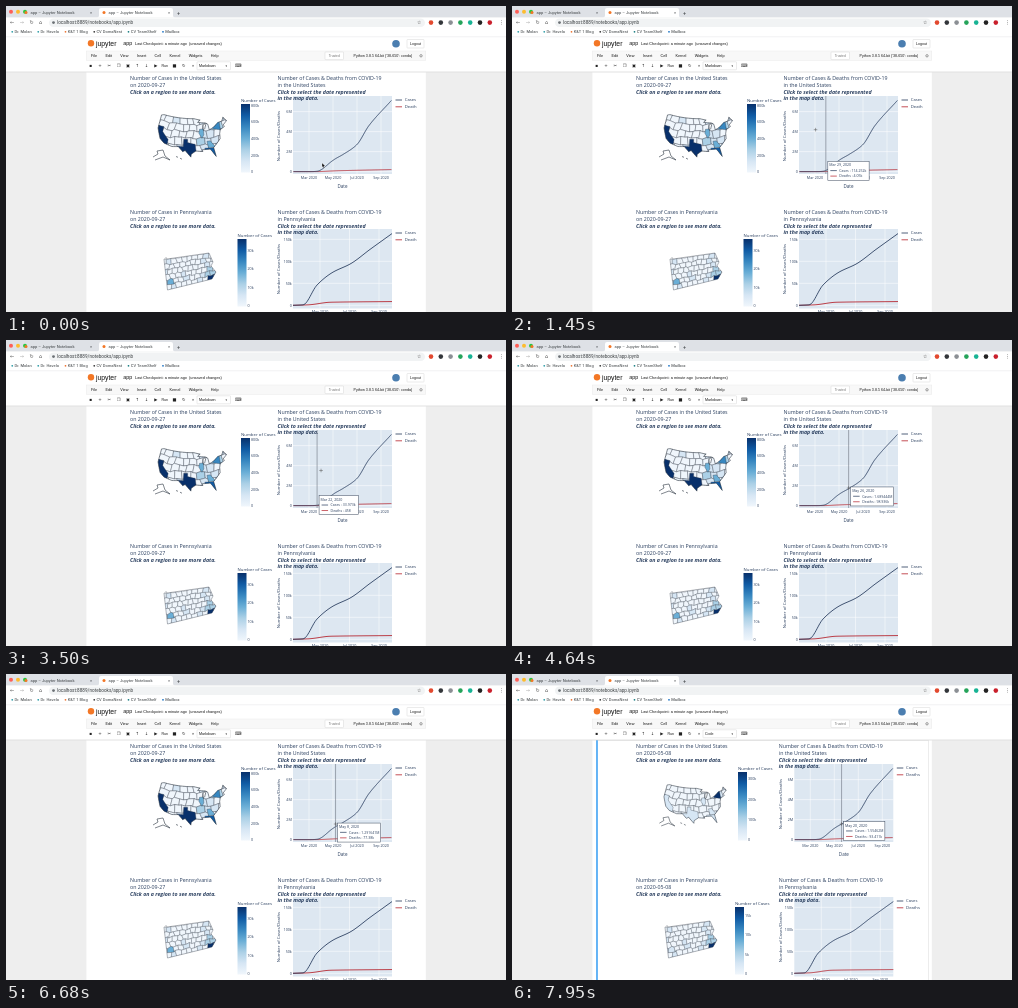
Animation of 500x306 px, one loop 8000 ms. Source, as an HTML page:

```html
<!DOCTYPE html>
<html lang="en">
<head>
<meta charset="utf-8">
<title>Notebook dashboard</title>
<style>
html, body { margin: 0; width: 100%; height: 100%; overflow: hidden; background: #eee; }
svg { display: block; width: 100%; height: 100%; }
text { white-space: pre; }
.ui { font-family: Roboto, sans-serif; fill: #3c4043; }
.nb { font-family: "Liberation Sans", sans-serif; fill: #111; }
.plot { font-family: "Open Sans", sans-serif; fill: #2a3f5f; }
.icon { font-family: "DejaVu Sans", sans-serif; fill: #222; }
.strong { font-weight: 700; font-style: italic; }
.mid { text-anchor: middle; }
.end { text-anchor: end; }
.borders { stroke: #2b3440; stroke-width: .36; stroke-linejoin: round; }
</style>
</head>
<body>
<svg id="stage" viewBox="0 0 500 306" preserveAspectRatio="none"></svg>
<script>
const LOOP = 8000, HOVER_LAG = 150, SELECT_AT = 7250, UPDATE_AT = 7600, SHIFT = -4.7;
const NAVY = '#24385a', RED = '#b5222b';
const BLUES = ['#f0f6fc', '#d6e6f4', '#abd0e6', '#6aaed6', '#3787c0', '#105ba4', '#08306b'];

const text = (x, y, size, str, cls = 'plot', extra = '') =>
  `<text x="${x}" y="${y}" font-size="${size}" class="${cls}" ${extra}>${str}</text>`;
const rect = (x, y, w, h, fill, extra = '') =>
  `<rect x="${x}" y="${y}" width="${w}" height="${h}" fill="${fill}" ${extra}/>`;
const dot = (x, y, r, fill) => `<circle cx="${x}" cy="${y}" r="${r}" fill="${fill}"/>`;
const line = (x1, y1, x2, y2, stroke, w = 0.5) =>
  `<path d="M${x1} ${y1}L${x2} ${y2}" stroke="${stroke}" stroke-width="${w}"/>`;
const path = pts => 'M' + pts.map(p => p.map(n => n.toFixed(2)).join(' ')).join('L');
const box = (x, y, w, h) => rect(x, y, w, h, '#fff', 'stroke="#ccc" stroke-width=".4" rx=".6"');
const repeat = (n, fn) => Array.from({ length: n }, (_, i) => fn(i));
const points = str => str.split(' ').map(p => p.split(',').map(Number));
const flow = (items, gap) => items.map((s, i) => `<tspan dx="${i ? gap : 0}">${s}</tspan>`).join('');

function randomizer(seed) {
  return () => (seed = seed * 16807 % 2147483647) / 2147483647;
}

// Monotone cubic through rows of [at, value, ...]
function spline(keys, at, col = 1) {
  const last = keys.length - 1;
  if (at <= keys[0][0]) return keys[0][col];
  if (at >= keys[last][0]) return keys[last][col];
  const slope = i => (keys[i + 1][col] - keys[i][col]) / (keys[i + 1][0] - keys[i][0]);
  const tangent = i => {
    if (i === 0 || i === last) return slope(i ? i - 1 : 0);
    const a = slope(i - 1), b = slope(i);
    return a * b > 0 ? 2 * a * b / (a + b) : 0;
  };
  const i = keys.findIndex(k => k[0] > at) - 1, h = keys[i + 1][0] - keys[i][0], s = (at - keys[i][0]) / h;
  const rise = s * s * (3 - 2 * s);
  return keys[i][col] * (1 - rise) + keys[i + 1][col] * rise +
    h * s * (1 - s) * ((1 - s) * tangent(i) - s * tangent(i + 1));
}

function browser() {
  let s = rect(0, 0, 500, 11.5, '#dee1e6') + rect(0, 11.5, 500, 20, '#fff');
  s += ['#fe5f57', '#febc2e', '#28c840'].map((c, i) => dot(5 + i * 7, 5.8, 2, c)).join('');
  s += '<path d="M91 11.5q2 0 2-2V4q0-2 2-2h70q2 0 2 2v5.500q0 2 2 2z" fill="#fff"/>';
  s += repeat(2, i => dot(20 + i * 78, 6.5, 1.5, '#f37726') +
    text(24.5 + i * 78, 8, 4.1, 'app – Jupyter Notebook', 'ui') + text(84 + i * 78, 8, 4, '×', 'ui')).join('');
  s += text(171, 8.6, 5.5, '+', 'ui');
  s += [...'←→↻⌂'].map((g, i) => text(4 + i * 9.7, 18.3, 5, g, 'icon', `opacity="${i === 1 ? 0.4 : 0.8}"`)).join('');
  s += rect(43, 12.4, 376, 8.6, '#f1f3f4', 'rx="4.3"') + dot(47.5, 16.6, 1.4, '#6b7075');
  s += text(51, 18.2, 4.65, 'localhost:8889/notebooks/app.ipynb', 'ui') + text(411, 18.3, 4.8, '☆', 'icon');
  s += ['#e2492f', '#33363a', '#8b8f94', '#25a35a', '#18b394', '#222', '#c9202c']
    .map((c, i) => dot(425 + i * 9.8, 16.6, 2.3, c)).join('');
  s += text(493, 18.3, 5, '⋮', 'icon');
  const marks = [['Dr. Molan', '#2a9aa5'], ['Dr. Havelo', '#2a9aa5'], ['K&amp;T 1 Blog', '#ee7432'], ['CV DomaNest', '#333'],
    ['CV TeamShelf', '#1a7f83'], ['Mailbox', '#1670c4']];
  s += text(5, 27.2, 4.1, flow(marks.map(([name, c]) => `<tspan fill="${c}">●</tspan> ${name}`), 5.2), 'ui');
  return s + line(0, 31, 500, 31, '#d5d7da');
}

function notebook() {
  let s = rect(0, 31.2, 500, 35, '#fff') + rect(80.4, 66, 339.4, 240, '#fff');
  s += dot(85, 37.3, 3.2, '#f37726') + text(90, 39.6, 6.8, 'jupyter', 'nb');
  s += text(117.3, 39.4, 5.3, 'app', 'nb') + text(129, 39.2, 3.85, 'Last Checkpoint: a minute ago  (unsaved changes)', 'nb');
  s += dot(390, 37.8, 3.8, '#4b7eb0') + box(401, 33.5, 17, 8.5) + text(409.5, 39.1, 3.6, 'Logout', 'nb mid');
  s += rect(80.4, 45, 339.4, 9.6, '#f8f8f8', 'stroke="#e7e7e7" stroke-width=".4"');
  s += text(85, 51.2, 3.8, flow(['File', 'Edit', 'View', 'Insert', 'Cell', 'Kernel', 'Widgets', 'Help'], 8.3), 'nb');
  s += box(319, 46, 18.5, 7.6) + text(328.2, 51, 3.3, 'Trusted', 'nb mid', 'opacity=".6"');
  s += text(347.5, 51.1, 3.65, "Python 3.8.5 64-bit ('38-650': conda)", 'nb');
  s += '<circle cx="415" cy="49.8" r="1.2" fill="none" stroke="#444" stroke-width=".5"/>';
  s += [...'▪+✂❐▣↑↓▶ ■↻»'].map((g, i) => text(84.7 + i * 9.3, 61.3, 4.2, g, 'icon mid')).join('');
  s += text(155.5, 61.2, 3.6, 'Run', 'nb') + box(191, 55.8, 33.5, 8) + text(219.5, 61, 3, '▾', 'icon');
  s += text(193, 61.1, 3.6, '', 'nb', 'id="cellType"') + text(229, 61.3, 4.5, '⌨', 'icon');
  s += line(0, 66, 500, 66, '#cfcfcf', 0.6);
  return s + `<g id="cellFrame">${rect(84.5, 66.3, 332, 250, 'none', 'stroke="#cfcfcf" stroke-width=".4"')}${rect(84.2, 66.3, 1.6, 240, '#42a5f5')}</g>`;
}

// Irregular brickwork of areas; place(u, v) maps the unit square to the stage
function patchwork(cols, rows, seed, place, shade) {
  const rand = randomizer(seed);
  const lattice = repeat(rows + 1, j => repeat(2 * cols + 4, i =>
    place((i - 1 + (rand() - 0.5) * 0.7) / (2 * cols), (j + (rand() - 0.5) * 0.35) / rows)));
  return repeat(rows, r => repeat(cols + 1, c => {
    const i = 2 * c + r % 2, top = lattice[r].slice(i, i + 3), bottom = lattice[r + 1].slice(i, i + 3).reverse();
    return `<path d="${path([...top, ...bottom])}Z" fill="${BLUES[shade(top[1], rand())]}"/>`;
  }).join('')).join('');
}

// Albers conic projection, so parallels bend
function project(lon, lat) {
  const rad = Math.PI / 180, n = 0.6028, a = n * (lon + 96) * rad;
  const rho = f => Math.sqrt(1.3512 - 2 * n * Math.sin(f * rad)) / n;
  return [187 + 95 * rho(lat) * Math.sin(a), 131 - 95 * (rho(38) - rho(lat) * Math.cos(a))];
}
const geo = str => {
  const pts = points(str);
  return path(pts.flatMap(([x, y], i) => {
    const [nx, ny] = pts[(i + 1) % pts.length];
    return repeat(4, k => project(x + (nx - x) * k / 4, y + (ny - y) * k / 4));
  })) + 'Z';
};
const COAST = geo('-124.7,48.4 -124.3,40.3 -120.6,34.6 -117.1,32.5 -111,31.3 -106.5,31.8 -103.1,29 -101.4,29.8 -97.4,25.9 ' +
  '-97.2,27.7 -94,29.6 -89.2,29.1 -89.5,30.2 -84,30.1 -82.7,28.5 -80.6,25.2 -81.4,30.7 -75.6,35.3 -75.1,38.4 -74,40.5 ' +
  '-70,41.8 -70.8,42.8 -67,44.8 -69.2,47.4 -71,45.3 -74.8,45 -78.9,42.8 -82.7,41.6 -83.3,45 -84.7,45.8 -86.4,42.5 ' +
  '-87.6,41.8 -87.5,44.5 -85,46 -92,46.7 -89.6,48 -95.2,49 -109,49 -122.7,49');

// Notable areas with their shade before and after the update
const STATES = [
  ['-126,42 -120,42 -120,39 -114.6,35 -114.6,32 -126,32', 6, 1],
  ['-103,36.5 -100,36.5 -100,34.6 -94.4,33.6 -93.7,28 -97,24 -107,27 -107,32 -103,32', 6, 1],
  ['-87.6,31 -81,30.7 -79,24 -88,28', 5, 1],
  ['-79.8,42 -73.9,40.4 -73.4,46 -80,44', 4, 6],
  ['-90.6,42.5 -87.5,42.5 -87.5,39 -89.2,37 -91.4,40.3', 3, 1],
  ['-85.6,35 -83.1,35 -80,31 -85,31', 3, 1]
];

function usMap(after) {
  const eastern = ([x], r) => after ? +(x > 203 && r > 0.6) : x < 190 ? +(r > 0.75) : r < 0.4 ? 0 : r < 0.75 ? 1 : 2;
  const place = (u, v) => project(-125 + 58 * Math.sign(u) * Math.abs(u) ** 0.85, 49.5 - 25 * v);
  const states = STATES.map(([area, a, b]) => `<path d="${geo(area)}" fill="${BLUES[after ? b : a]}"/>`).join('');
  return `<g class="borders" transform="${after ? 'translate(13.6 11.8) scale(.91)' : ''}">
    <g clip-path="url(#land)">${patchwork(10, 6, 5, place, eastern)}${states}</g>
    <path d="${COAST}M147 151l5-3-1-3 6-1 2 6 5 4-7-3-8 3M170 150.500l2 .8M174 152.200l2 1" fill="none" stroke-width=".6"/></g>`;
}

const REGION = path(points('158,253.5 160,251.5 161,253 203,247 207,256 205,260 210,266 206,273 161.5,284')) + 'Z';
function countyMap(after) {
  const place = (u, v) => [157 + 53 * u + 3 * v, 254 - 8 * u + (30.5 - 4 * u) * v];
  const near = ([x, y], hx, hy) => Math.hypot(x - hx, y - hy);
  const shade = (p, r) => near(p, 207, 269) < 3 ? 6 : near(p, 205, 267) < 7 ? 2 : near(p, 167, 272) < 3 ? (after ? 1 : 3) : +(r > 0.8);
  return `<g class="borders" transform="translate(${after ? -5 : 0} 0)"><g clip-path="url(#region)" stroke-width=".3">
    ${patchwork(10, 6, 11, place, shade)}</g><path d="${REGION}" fill="none"/></g>`;
}

function colorBar(x, y, height, step, unit, count) {
  return text(x, y - 2.4, 4.3, 'Number of Cases') + rect(x, y, 9, height, 'url(#blues)') +
    repeat(count, i => text(x + 10, y + height + 0.8 - i * step, 3.7, i ? i * unit + 'k' : '0')).join('');
}

// Known totals; day 0 is 22 January 2020
const CASES = [[0, 0], [45, 400], [60, 33973], [100, 1109726], [107, 1291641], [119, 1554620], [125, 1689444],
  [161, 2690000], [192, 4600000], [249, 7110000]];
const DEATHS = [[0, 0], [60, 458], [100, 64902], [107, 77380], [119, 93411], [125, 98936], [249, 204500]];
const REGION_CASES = [[287, 0], [297, 1], [311, 46], [326, 74], [345, 95], [364, 127], [386, 163]];
const REGION_DEATHS = [[287, 0], [302, 1], [325, 7], [386, 8.5]];
const dayX = day => 287.5 + 0.393 * day;
const countY = v => 165.6 - v / 1e5;

function chart({ top, bottom, zero, stepY, labelY, firstX, stepX, months, cases, deaths, after }) {
  const trace = (pts, c) => `<path d="${path(pts)}" fill="none" stroke="${c}" stroke-width=".85"/>`;
  let s = rect(287, top, 99, bottom - top, '#dde7f1');
  s += repeat(4, i => line(287, zero - i * stepY, 386, zero - i * stepY, '#fff') +
    text(285.8, zero - i * stepY + 1.3, 3.7, i ? labelY(i) : '0', 'plot end')).join('');
  s += months.map((m, i) => line(firstX + i * stepX, top, firstX + i * stepX, bottom, '#fff') +
    text(firstX + i * stepX, bottom + 4.8, 3.7, m + ' 2020', 'plot mid')).join('');
  s += trace(deaths, RED) + trace(cases, NAVY);
  s += [['Cases', NAVY], [after ? 'Deaths' : 'Death', RED]].map(([label, c], i) =>
    line(389.5, top + 4 + i * 6.8, 396, top + 4 + i * 6.8, c, 0.8) + text(398.8, top + 5.4 + i * 6.8, 4.2, label)).join('');
  return s + text(0, 0, 4.3, 'Number of Cases/Deaths', 'plot mid', `transform="translate(274.3 ${top + 40}) rotate(-90)"`);
}

const heading = (x, y, lines) =>
  lines.map((l, i) => text(x, y + i * 6.7, 5.25, l, i < 2 ? 'plot' : 'plot strong')).join('');

function dashboard(after) {
  const daily = series => repeat(250, d => [dayX(d), countY(spline(series, d))]);
  const regional = series => repeat(100, i => [287 + i, 299.3 - 0.44 * spline(series, 287 + i)]);
  const date = after ? 'on 2020-05-08' : 'on 2020-09-27';
  const left = ['the United States', 'Pennsylvania'].map((place, i) =>
    heading(124, 74.3 + i * 134, ['Number of Cases in ' + place, date, 'Click on a region to see more data.'])).join('');
  const right = ['the United States', 'Pennsylvania'].map((place, i) =>
    heading(271.5, 74.3 + i * 134, ['Number of Cases &amp; Deaths from COVID-19', 'in ' + place,
      'Click to select the date represented', 'in the map data.'])).join('');
  const bars = after
    ? colorBar(226, 98, 68.5, 20.4, 100, 4) + colorBar(223, 233, 67.5, 19.5, 5, 4)
    : colorBar(235, 98, 68.5, 16.7, 200, 5) + colorBar(231.5, 233, 67.5, 18.6, 10, 4);
  const charts = chart({ top: 90, bottom: 168, zero: 165.6, stepY: 20, labelY: i => 2 * i + 'M', firstX: 303, stepX: 24,
    months: ['Mar', 'May', 'Jul', 'Sep'], cases: daily(CASES), deaths: daily(DEATHS), after }) +
    chart({ top: 223, bottom: 302.5, zero: 299.3, stepY: 22, labelY: i => 50 * i + 'k', firstX: 314, stepX: 29.5,
      months: ['May', 'Jul', 'Sep'], cases: regional(REGION_CASES), deaths: regional(REGION_DEATHS), after });
  return left + usMap(after) + countyMap(after) + bars +
    `<g transform="translate(${after ? SHIFT : 0} 0)">${charts}${text(336.5, 182, 4.5, 'Date', 'plot mid')}${right}</g>`;
}

const stage = document.getElementById('stage');
stage.innerHTML = `<defs><clipPath id="land"><path d="${COAST}"/></clipPath><clipPath id="region"><path d="${REGION}"/></clipPath>
  <linearGradient id="blues" x1="0" y1="1" x2="0" y2="0">${BLUES.map((c, i) => `<stop offset="${i / 6}" stop-color="${c}"/>`).join('')}</linearGradient></defs>
  ${rect(0, 0, 500, 306, '#eee')}${browser()}${notebook()}
  <g id="before">${dashboard(false)}</g><g id="after">${dashboard(true)}</g><g id="hover"></g>
  <path id="arrow" d="M0 0v4.300l1-.9.8 1.800.8-.4-.8-1.700h1.400z" fill="#111" stroke="#fff" stroke-width=".3"/>
  <path id="cross" d="M-1.800 0h3.600M0-1.800v3.600" stroke="#555" stroke-width=".5"/>`;

const POINTER = [[0, 316, 157], [580, 326.8, 154], [950, 326.8, 150], [1500, 300, 122], [2230, 197, 108.5],
  [2800, 199, 114], [3500, 315, 130.5], [4300, 336.6, 148], [5000, 336.6, 148], [6200, 329.55, 150]];

const short = v => v >= 1e6 ? +(v / 1e6).toFixed(6) + 'M' : v >= 1e3 ? +(v / 1e3).toFixed(3) + 'k' : String(Math.round(v));
const dateLabel = day => new Date(Date.UTC(2020, 0, 22 + day))
  .toLocaleDateString('en-US', { month: 'short', day: 'numeric', year: 'numeric', timeZone: 'UTC' });

function hoverLabel(day, shift) {
  const cases = spline(CASES, day), deaths = spline(DEATHS, day), x = dayX(day) + shift;
  const rows = [[`Cases : ${short(cases)}`, NAVY], [`Deaths : ${short(deaths)}`, RED]];
  const left = x + 2, top = (countY(cases) + countY(deaths)) / 2 - 9.7;
  const width = 12.5 + 1.8 * Math.max(...rows.map(r => r[0].length));
  return line(x, 90, x, 168, '#6d7480', 0.6) + rect(left, top, width, 19, '#fff', 'stroke="#3c485c" stroke-width=".5"') +
    text(left + 1.5, top + 5, 3.6, dateLabel(day)) +
    rows.map(([label, c], i) => line(left + 2.5, top + 9.3 + i * 5.5, left + 9, top + 9.3 + i * 5.5, c, 0.7) +
      text(left + 11.5, top + 10.6 + i * 5.5, 3.5, label)).join('');
}

const el = id => document.getElementById(id);
const show = (id, on) => el(id).setAttribute('visibility', on ? 'visible' : 'hidden');

function draw(t) {
  const updated = t >= UPDATE_AT, selected = t >= SELECT_AT, shift = updated ? SHIFT : 0;
  show('before', !updated);
  show('after', updated);
  show('cellFrame', selected);
  el('cellType').textContent = selected ? 'Code' : 'Markdown';
  // The label trails the pointer and stays at its last day once the pointer leaves
  const day = Math.max(60, Math.round((spline(POINTER, t - HOVER_LAG) - shift - dayX(0)) / 0.393));
  el('hover').innerHTML = t < HOVER_LAG ? '' : hoverLabel(day, shift);
  const x = spline(POINTER, t), y = spline(POINTER, t, 2), onChart = t >= HOVER_LAG && x > 287;
  show('arrow', !onChart);
  show('cross', onChart);
  for (const id of ['arrow', 'cross']) el(id).setAttribute('transform', `translate(${x.toFixed(2)} ${y.toFixed(2)})`);
}

const start = performance.now();
function tick() {
  draw((performance.now() - start) % LOOP);
  requestAnimationFrame(tick);
}
tick();
</script>
</body>
</html>
```
